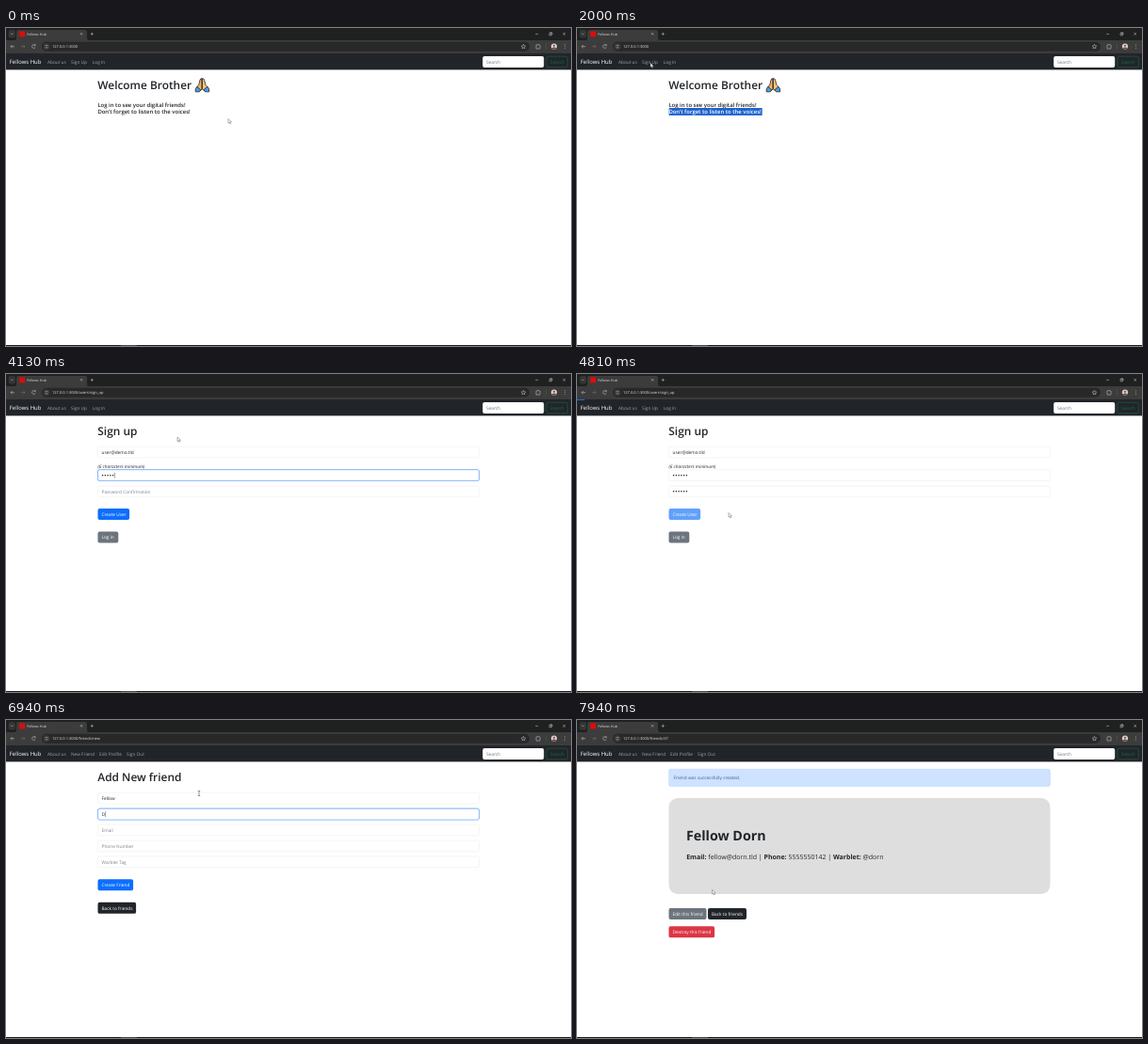
An HTML page that plays this animation: 600x338 px, repeating every 8000 ms.

```html
<!DOCTYPE html>
<html lang="en">
<head>
<meta charset="utf-8">
<title>Fellows Hub</title>
<style>
  html, body { margin: 0; width: 100%; height: 100%; overflow: hidden; background: #fff; }
  svg { display: block; width: 100vw; height: 100vh; }
  text { font-family: "Open Sans", "Noto Sans", sans-serif; text-rendering: geometricPrecision; white-space: pre; }
  .icon { fill: none; stroke: #c8c8c8; stroke-width: .55; }
</style>
</head>
<body>
<svg id="stage" viewBox="0 0 600 338" preserveAspectRatio="none"></svg>
<script>
const LOOP = 8000, STEP = 62.5;
const INK = '#212529', BLUE = '#0d6efd', GRAY = '#6c757d', RED = '#dc3545';
const BODY = 4.76, H5 = 5.95, H1 = 11.9;

const text = (x, y, str, { size = BODY, weight = 400, fill = INK, extra = '' } = {}) =>
  `<text x="${x}" y="${y}" font-size="${size}" font-weight="${weight}" fill="${fill}" ${extra}>${str}</text>`;
const rect = (x, y, w, h, fill, r = 0, extra = '') =>
  `<rect x="${x}" y="${y}" width="${w}" height="${h}" rx="${r}" fill="${fill}" ${extra}/>`;
const icon = d => `<path class="icon" d="${d}"/>`;
const group = (id, body) => `<g id="${id}">${body}</g>`;
const heading = str => text(97.3, 64.9, str, { size: H1, weight: 600 });
const button = (x, y, w, label, fill, id = '') =>
  `<g id="${id}">${rect(x, y, w, 12, fill, 1.9)}${text(x + 4, y + 7.7, label, { fill: '#fff' })}</g>`;
const notice = str =>
  rect(97.6, 52.2, 404.8, 18.2, '#cfe2ff', 1.9, 'stroke="#9ec5fe" stroke-width=".35"') +
  text(102.6, 63.2, str, { fill: '#40618f' });

// focus = when the field is entered, from/to = typing span
const fields = [
  { form: 'signup', y: 77.2, hint: 'Email', value: 'user@demo.tld', focus: 2250, from: 3110, to: 3850, blur: 3900 },
  { form: 'signup', y: 101.8, hint: 'Password', value: 'secret', focus: 3900, from: 3950, to: 4200, blur: 4250, secret: true },
  { form: 'signup', y: 118.9, hint: 'Password Confirmation', value: 'secret', focus: 4250, from: 4300, to: 4550, blur: 4700, secret: true },
  { form: 'create', y: 77.2, hint: 'First Name', value: 'Fellow', focus: 6120, from: 6550, to: 6870, blur: 6880 },
  { form: 'create', y: 94.2, hint: 'Last Name', value: 'Dorn', focus: 6880, from: 6930, to: 7060, blur: 7080 },
  { form: 'create', y: 111.1, hint: 'Email', value: 'fellow@dorn.tld', focus: 7080, from: 7100, to: 7330, blur: 7340 },
  { form: 'create', y: 128, hint: 'Phone Number', value: '5555550142', focus: 7340, from: 7360, to: 7500, blur: 7510 },
  { form: 'create', y: 144.9, hint: 'Warblet Tag', value: '@dorn', focus: 7510, from: 7520, to: 7590, blur: 7620 },
];
const fieldsOf = form => fields.map((f, i) => f.form !== form ? '' :
  `<g id="field${i}">${rect(97.6, f.y, 404.8, 11.7, '#fff', 1.9)}${text(101.6, f.y + 7.6, '')}` +
  `<g class="dots"></g>${rect(101.8, f.y + 3, .4, 5.8, '#222', 0, 'class="caret"')}</g>`).join('');

const pages = [
  { id: 'home', at: 0, path: '' },
  { id: 'signup', at: 2250, path: '/users/sign_up' },
  { id: 'list', at: 4960, path: '' },
  { id: 'create', at: 6120, path: '/friends/new' },
  { id: 'show', at: 7730, path: '/friends/37' },
];
const loads = [[2130, 2250], [4750, 4960], [6030, 6120], [7630, 7730]];
const submits = { signupSubmit: [4700, 4960], createSubmit: [7620, 7730] };

const cursorPath = [
  [0, 236, 96.5], [125, 236, 96.5], [300, 197, 89], [650, 98, 89], [810, 108, 105], [1200, 108, 105],
  [1450, 54, 37], [1800, 54, 37], [2000, 78, 37], [2250, 78, 37], [2550, 182, 67], [4300, 182, 67],
  [4600, 161, 147.5], [4900, 161, 147.5], [5300, 185, 100.5], [5750, 185, 100.5], [6000, 115, 115],
  [6150, 115, 115], [6500, 205, 78], [7450, 205, 78], [7680, 143.6, 180.5], [LOOP, 143.6, 180.5],
];

const hands = `
  <g stroke="#222" stroke-width=".8" stroke-linejoin="round">
    <path fill="#f7b565" d="M208.2 53.8q-1.7-.5-2.2 1.4l-1.2 5-2.2 3.2 3.4 3.3 2.4-1.8z"/>
    <path fill="#fbc47b" d="M208.2 53.8q1.9-.5 2.4 1.4l1.2 5 2.6 3.2-3.4 3.3-2.8-1.8z"/>
    <path fill="#4b9ee0" d="M202.8 62.3l-1.6 2.5v3h4.2l1.4-2zM213.9 62.3l1.7 2.5v3h-4.2l-1.5-2z"/>
    <path fill="none" d="M208.2 54v10.8"/>
  </g>`;

const voices = fill => text(97.4, 91, 'Don’t forget to listen to the voices!', { size: H5, weight: 600, fill });

const browser =
  rect(0, 0, 600, 13, '#1f2020') +
  rect(2.6, 2, 7.4, 8.6, '#343535', 2) + icon('M5 5.6l1.3 1.3 1.3-1.3') +
  '<path fill="#3c3c3c" d="M9 13q2 0 2-2V4q0-2 2-2h71q2 0 2 2v7q0 2 2 2z"/>' +
  rect(14.2, 3.5, 5.8, 5.8, '#e00b0b') +
  text(22.2, 7.9, 'Fellows Hub', { size: 3.7, fill: '#dedede' }) +
  icon('M79 5.2l2.2 2.2m0-2.2l-2.2 2.2M89.7 6.3h3.2m-1.6-1.6v3.2') +
  icon('M562.3 6.4h2.8M577 5.6h2.2v2.2h-2.2zM577.8 5.6v-.8h2.2v2.2h-.8M591.4 5l2.6 2.6m0-2.6l-2.6 2.6') +
  rect(0, 13, 600, 14, '#3c3c3c') +
  rect(38, 14.7, 518, 10, '#282828', 5) + '<circle cx="43" cy="19.7" r="3.4" fill="#3c3c3c"/>' +
  icon('M9 19.7H5m1.7-1.7L5 19.7l1.7 1.7M31 18.4a1.9 1.9 0 1 0 .2 2M31.2 17.2v1.5h-1.5') +
  '<path class="icon" style="stroke:#777" d="M16 19.7h4m-1.7-1.7l1.7 1.7-1.7 1.7"/>' +
  icon('M41.8 18.6h2.5M41.8 20.8h2.5') +
  icon('M549.5 17.4l.7 1.5 1.6.2-1.2 1.1.3 1.6-1.4-.8-1.4.8.3-1.6-1.2-1.1 1.6-.2z') +
  icon('M563 18h1.3q.7-1.6 1.4 0h1.3v1.3q1.4.7 0 1.4V22h-4z') +
  rect(573.3, 16.8, .35, 5.5, '#666') +
  '<circle cx="582" cy="19.6" r="3.1" fill="#d8cfcb"/><circle cx="582" cy="18.8" r="1.1" fill="#8b4c48"/><path fill="#733d3b" d="M579.7 21.7q2.3-2.6 4.6 0-2.3 1.8-4.6 0z"/>' +
  [17.7, 19.6, 21.5].map(y => `<circle cx="593.4" cy="${y}" r=".45" fill="#ccc"/>`).join('') +
  text(49, 21.2, '', { size: 4, fill: '#e4e4e4', extra: 'id="address"' });

const links = list => list.map(([x, s]) => text(x, 38, s, { fill: '#a0a2a4' })).join('');
const navbar =
  rect(0, 27, 600, 17.4, INK) +
  text(3.8, 38.4, 'Fellows Hub', { size: H5, fill: '#fff' }) + links([[44, 'About us']]) +
  group('guestNav', links([[69, 'Sign Up'], [91.8, 'Log In']])) +
  group('userNav', links([[69, 'New Friend'], [99, 'Edit Profile'], [128, 'Sign Out']])) +
  rect(506.2, 30, 65, 12, '#fff', 1.9) + text(510, 37.9, 'Search', { fill: GRAY }) +
  rect(574, 30.2, 22.4, 11.6, 'none', 1.9, 'stroke="#198754" stroke-width=".4"') +
  text(577.8, 37.9, 'Search', { fill: '#176b46' }) +
  rect(0, 27, 0, .95, '#0076ff', 0, 'id="progress"');

const home = heading('Welcome Brother') + hands +
  text(97.4, 83.5, 'Log in to see your digital friends!', { size: H5, weight: 600 }) + voices(INK) +
  `<clipPath id="picked">${rect(97.4, 84.9, 0, 8, '#000', 0, 'id="pickedBox"')}</clipPath>` +
  `<g clip-path="url(#picked)">${rect(97.4, 84.9, 99.4, 8, '#1c62cc')}${voices('#fff')}</g>`;

const signup = heading('Sign up') +
  text(97.4, 100, '(6 characters minimum)', { extra: 'font-style="italic"' }) + fieldsOf('signup') +
  button(97.5, 143, 33.6, 'Create User', BLUE, 'signupSubmit') + button(97.5, 167.5, 21.8, 'Log in', GRAY);

const list = notice('Welcome! You have signed up successfully.') +
  rect(97.5, 83, 405, 13.4, INK) +
  [[100, 'Name'], [192, 'Email'], [278.4, 'Phone'], [374.6, 'Warblet']]
    .map(([x, s]) => text(x, 91.4, s, { weight: 700, fill: '#fff' })).join('') +
  [189.2, 275.7, 371.8, 480].map(x => rect(x, 83, .3, 13.4, '#373b3e')).join('') +
  button(97.5, 108.6, 32.6, 'New friend', BLUE);

const create = heading('Add New friend') + fieldsOf('create') +
  button(97.5, 169.2, 37.6, 'Create Friend', BLUE, 'createSubmit') +
  button(97.5, 193.8, 40.6, 'Back to friends', INK);

const bold = s => `<tspan font-weight="700">${s}</tspan>`;
const show = notice('Friend was successfully created.') +
  rect(97.5, 83, 405, 102, '#dedede', 9.4) +
  text(116, 128, 'Fellow Dorn', { size: 14.25, weight: 700 }) +
  text(116.2, 148.4, `${bold('Email:')} fellow@dorn.tld | ${bold('Phone:')} 5555550142 | ${bold('Warblet:')} @dorn`, { size: 7 }) +
  button(97.5, 200, 40, 'Edit this friend', GRAY) + button(139, 200, 41, 'Back to friends', INK) +
  button(97.5, 219.3, 48.6, 'Destroy this friend', RED);

const bodies = { home, signup, list, create, show };
document.getElementById('stage').innerHTML =
  rect(0, 0, 600, 338, '#fff') + pages.map(p => group(p.id, bodies[p.id])).join('') +
  browser + navbar + rect(0, 337, 600, 1, '#181818') + rect(122, 337, 17, 1, '#444') +
  group('cursor',
    '<path id="arrow" fill="#fff" stroke="#555" stroke-width=".45" stroke-linejoin="round" d="M0 0v4.6l1.1-.9.8 1.7.8-.4-.8-1.6h1.5z"/>' +
    '<path id="beam" fill="none" stroke="#333" stroke-width=".5" d="M-1.2-2.5h2.4M0-2.5v5M-1.2 2.5h2.4"/>');

const el = id => document.getElementById(id);
const display = (node, on) => { node.style.display = on ? '' : 'none'; };
const within = (t, [a, b]) => t >= a && t < b;
const clamp = v => Math.max(0, Math.min(1, v));

function cursorAt(t) {
  const i = cursorPath.findIndex(p => p[0] > t);
  const [t0, x0, y0] = cursorPath[i - 1], [t1, x1, y1] = cursorPath[i];
  const k = (t - t0) / (t1 - t0), e = k * k * (3 - 2 * k);
  return [x0 + (x1 - x0) * e, y0 + (y1 - y0) * e];
}

function drawField(f, i, t) {
  const node = el('field' + i), box = node.querySelector('rect'), label = node.querySelector('text');
  const count = t < f.from ? 0 : Math.min(f.value.length, 1 + Math.floor((t - f.from) / (f.to - f.from) * f.value.length));
  const focused = within(t, [f.focus, f.blur]);
  box.setAttribute('stroke', focused ? '#86b7fe' : '#dee2e6');
  box.setAttribute('stroke-width', focused ? .6 : .35);
  box.style.filter = focused ? 'drop-shadow(0 0 .7px #0d6efd)' : '';
  label.textContent = !count ? f.hint : f.secret ? '' : f.value.slice(0, count);
  label.setAttribute('fill', count ? INK : '#7b838a');
  node.querySelector('.dots').innerHTML = !f.secret ? '' : Array.from({ length: count }, (_, n) =>
    `<circle cx="${102.6 + n * 2.75}" cy="${f.y + 5.9}" r=".8" fill="${INK}"/>`).join('');
  const width = !count ? 0 : f.secret ? count * 2.75 : label.getComputedTextLength();
  const caret = node.querySelector('.caret');
  caret.setAttribute('x', 101.8 + width);
  display(caret, focused);
}

function render(t) {
  const page = pages.filter(p => p.at <= t).pop();
  pages.forEach(p => display(el(p.id), p === page));
  el('address').textContent = '127.0.0.1:3000' + page.path;
  const guest = page.id === 'home' || page.id === 'signup';
  display(el('guestNav'), guest);
  display(el('userNav'), !guest);

  fields.forEach((f, i) => { if (f.form === page.id) drawField(f, i, t); });
  for (const id in submits) el(id).setAttribute('opacity', within(t, submits[id]) ? .65 : 1);
  const load = loads.find(span => within(t, span));
  el('progress').setAttribute('width', load ? 8 + 60 * (t - load[0]) / (load[1] - load[0]) : 0);

  const [x, y] = cursorAt(t);
  el('cursor').setAttribute('transform', `translate(${x} ${y})`);
  const beam = within(t, [250, 690]) || within(t, [6400, 7520]);
  display(el('beam'), beam);
  display(el('arrow'), !beam);

  const left = t < 300 ? 196.8 : t < 650 ? Math.max(97.4, x) : 97.4;
  el('pickedBox').setAttribute('x', left);
  el('pickedBox').setAttribute('width', 99.4 * clamp((196.8 - left) / 99.4));
}

const start = performance.now();
function tick() {
  const t = (performance.now() - start) % LOOP;
  render(Math.floor(t / STEP) * STEP);
  requestAnimationFrame(tick);
}
tick();
</script>
</body>
</html>
```
